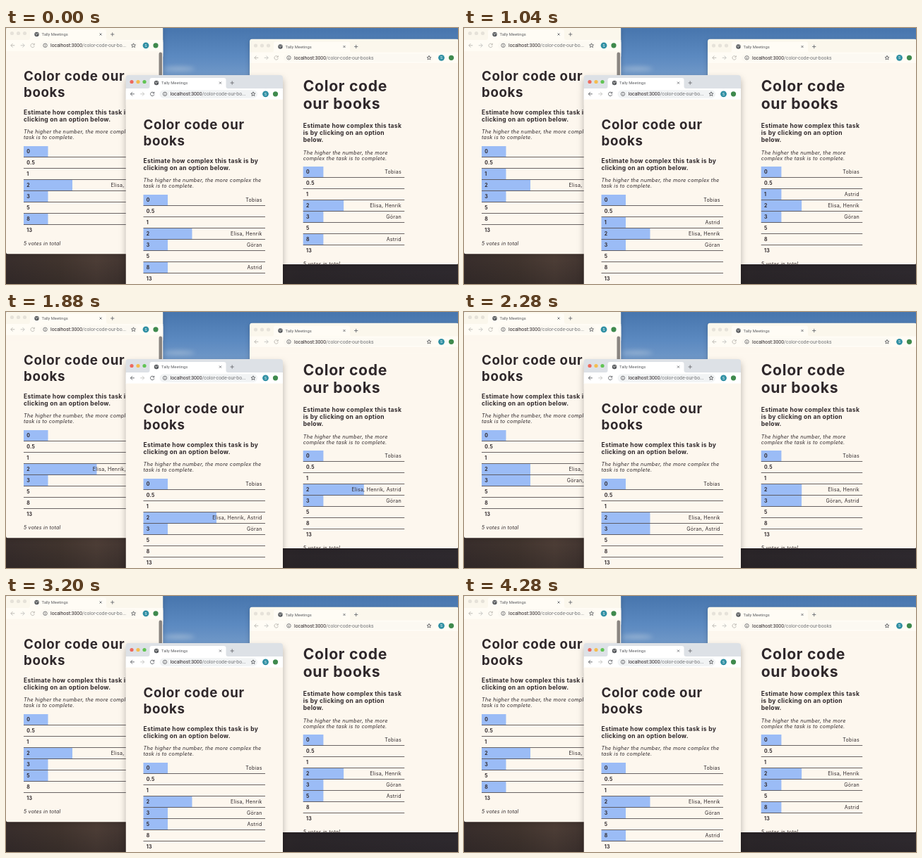
Write an HTML page that moves like this. It is 640 by 364 pixels and loops after 4320 ms.

```html
<!DOCTYPE html>
<html lang="en">
<head>
<meta charset="utf-8">
<title>Task voting</title>
<style>
  html, body { margin: 0; width: 100%; height: 100%; overflow: hidden; background: #332a2a; }
  #stage { display: block; width: 640px; height: 364px; }
  text { font-family: Inter, "Open Sans", sans-serif; letter-spacing: .035em; fill: #2f282b; white-space: pre; }
  .ui { font-family: Roboto, Arial, sans-serif; letter-spacing: 0; }
  .b { font-weight: 700; }
  .i { font-style: italic; }
  .win { filter: drop-shadow(0 2px 3px rgba(0, 0, 0, .2)); }
  .win.active { filter: drop-shadow(0 5px 5px rgba(0, 0, 0, .28)); }
  .icon { fill: none; stroke-width: .9; }
</style>
</head>
<body>
<svg id="stage" viewBox="0 0 640 364">
  <defs>
    <linearGradient id="sky" x2="0" y2="1">
      <stop offset="0" stop-color="#4775ad"/>
      <stop offset=".5" stop-color="#5b89c0"/>
      <stop offset="1" stop-color="#7a9fcb"/>
    </linearGradient>
    <linearGradient id="ground">
      <stop offset="0" stop-color="#3a2f2d"/>
      <stop offset=".12" stop-color="#43362f"/>
      <stop offset=".2" stop-color="#504038"/>
      <stop offset=".3" stop-color="#40332f"/>
      <stop offset=".65" stop-color="#2d282c"/>
      <stop offset="1" stop-color="#322d33"/>
    </linearGradient>
    <linearGradient id="dusk" x2="0" y2="1">
      <stop offset="0" stop-color="#1e1a1c" stop-opacity="0"/>
      <stop offset="1" stop-color="#1e1a1c" stop-opacity=".35"/>
    </linearGradient>
    <filter id="soft" x="-50%" y="-200%" width="200%" height="500%">
      <feGaussianBlur stdDeviation="3"/>
    </filter>
  </defs>
  <rect width="640" height="80" fill="url(#sky)"/>
  <ellipse cx="245" cy="58" rx="22" ry="3" fill="#c3d0e0" opacity=".5" filter="url(#soft)"/>
  <rect y="80" width="640" height="284" fill="url(#ground)"/>
  <rect y="320" width="640" height="44" fill="url(#dusk)"/>
  <g id="windows"></g>
</svg>
<script>
const LOOP = 4320, STEP = 40, FADE = 300, ROW = 16, VOTES = 5;
const options = ['0', '0.5', '1', '2', '3', '5', '8', '13'];
const voters = { 0: ['Tobias'], 3: ['Elisa', 'Henrik'], 4: ['Göran'] };
const mover = 'Astrid';
// [start time, option index the mover switches to]
const moves = [[350, 2], [1180, 3], [1980, 4], [2830, 5], [3670, 6]];

// blocks: first baseline, line height, font size, class, lines
const narrow = {
  left: 25, width: 172.5, rowY: 185.5,
  blocks: [
    [77.2, 23, 18.65, 'b', ['Color code our', 'books']],
    [124.8, 10.1, 8.5, 'b', ['Estimate how complex this task is by', 'clicking on an option below.']],
    [151.8, 8.4, 7.25, 'i', ['The higher the number, the more complex the', 'task is to complete.']]
  ]
};
const wide = {
  left: 75.7, width: 143.5, rowY: 197,
  blocks: [
    [74, 25.7, 21.1, 'b', ['Color code', 'our books']],
    [126.6, 10.1, 8.5, 'b', ['Estimate how complex this task', 'is by clicking on an option', 'below.']],
    [164.3, 8.4, 7.25, 'i', ['The higher the number, the more', 'complex the task is to complete.']]
  ]
};
const windows = [
  { x: 0, y: -2, w: 222.5, h: 323.5, page: narrow, path: 'color-code-our-bo...', lag: 0, scroll: true },
  { x: 345, y: 15.5, w: 296, h: 320.5, page: wide, path: 'color-code-our-books', lag: 25 },
  { x: 169.5, y: 67, w: 222.5, h: 400, page: narrow, path: 'color-code-our-bo...', lag: 0, active: true }
];

const text = (x, y, size, cls, str, attrs = '') =>
  `<text x="${x}" y="${y}" font-size="${size}" class="${cls}" ${attrs}>${str}</text>`;
const rect = (x, y, w, h, fill, attrs = '') =>
  `<rect x="${x}" y="${y}" width="${w}" height="${h}" fill="${fill}" ${attrs}/>`;
const circle = (x, y, r, fill) => `<circle cx="${x}" cy="${y}" r="${r}" fill="${fill}"/>`;
const icon = (x, y, d, color) =>
  `<path class="icon" transform="translate(${x} ${y})" d="${d}" stroke="${color}"/>`;

function browserBar({ w, active, path }) {
  const ink = active ? '#5a5d61' : '#b9b6b0';
  const lights = active ? ['#ed6a5e', '#f4bd4f', '#61c454'] : Array(3).fill('#e6e2d9');
  const bar = active ? '#fff' : '#fffcf5';
  return rect(0, 0, w, 40, active ? '#dde1e6' : '#fbf7ec', 'rx="4"')
    + lights.map((c, i) => circle(8.5 + 9 * i, 9.5, 2.6, c)).join('')
    + `<path d="M31 19q3 0 3-3V7q0-3 3-3H139q3 0 3 3v9q0 3 3 3z" fill="${bar}"/>`
    + circle(43.5, 11, 3.2, '#55585c')
    + icon(43.5, 11, 'M-2-1.2L0-.4L-.6 1.6M1-2L2-.2', '#d8d8d6')
    + text(50.5, 13, 5.8, 'ui', 'Tally Meetings', 'style="fill:#5d5f63"')
    + icon(134, 11, 'M-1.5-1.5L1.5 1.5M1.5-1.5L-1.5 1.5', '#6d6f73')
    + icon(150.7, 11, 'M-2.6 0H2.6M0-2.6V2.6', '#6d6f73')
    + rect(0, 19, w, 16, bar)
    + rect(48, 21.3, w - 84, 11.4, active ? '#f1f3f4' : '#fcf9f2', 'rx="5.7"')
    + icon(9.5, 26.8, 'M2.8 0H-2.6M0-2.7L-2.7 0L0 2.7', ink)
    + icon(23.5, 26.8, 'M-2.8 0H2.6M0-2.7L2.7 0L0 2.7', '#c2c2c0')
    + icon(37.7, 26.8, 'M2-1.7A2.7 2.7 0 1 0 2.6 .7M2.6-3V-.9H.5', ink)
    + icon(55.5, 26.8, 'M-2.7 0a2.7 2.7 0 1 0 5.4 0a2.7 2.7 0 1 0-5.4 0M0-.3V1.6M0-1.6V-.9', '#6b6d70')
    + text(63, 29.2, 6.85, 'ui', `localhost:3000<tspan fill="#75777a">/${path}</tspan>`)
    + icon(w - 42, 26.8, 'M0-3L.9-.9L3-.8L1.4 .6L1.9 2.7L0 1.5L-1.9 2.7L-1.4 .6L-3-.8L-.9-.9Z', '#606266')
    + circle(w - 24.5, 26.8, 4.4, '#2f8fa3')
    + text(w - 24.5, 28.6, 5, 'ui', 'S', 'text-anchor="middle" style="fill:#fff"')
    + circle(w - 10.5, 26.8, 3.6, '#3f8a4e');
}

function pageBody({ left, width, rowY, blocks }) {
  const copy = blocks.map(([y, gap, size, cls, lines]) =>
    lines.map((s, i) => text(left, y + gap * i, size, cls, s)).join('')).join('');
  const rows = options.map((label, i) => {
    const y = rowY + ROW * i;
    return rect(left, y - 15.5, 0, 15.5, '#9bbcf6', 'data-bar')
      + (i < options.length - 1 ? rect(left, y - .5, width, .75, '#3a3336') : '')
      + text(left + 4.3, y - 5.7, 6.9, 'b', label)
      + text(left + width - 4.3, y - 5.8, 7.1, '', '', 'text-anchor="end" data-names');
  }).join('');
  return copy + rows + text(left, rowY + 125.5, 7, 'i', VOTES + ' votes in total');
}

document.getElementById('windows').innerHTML = windows.map(v =>
  `<g class="win ${v.active ? 'active' : ''}"><svg x="${v.x}" y="${v.y}" width="${v.w}" height="${v.h}">`
  + rect(0, 20, v.w, v.h - 20, '#fdf7ee', 'rx="3"')
  + browserBar(v) + rect(0, 34.6, v.w, 8, '#fdf7ee') + pageBody(v.page)
  + (v.scroll ? rect(216.5, 36.5, 4.6, 90, '#8a8581', 'rx="2.3"') : '')
  + '</svg></g>').join('');

document.querySelectorAll('.win').forEach((el, i) => {
  windows[i].bars = el.querySelectorAll('[data-bar]');
  windows[i].names = el.querySelectorAll('[data-names]');
});

// CSS "ease": cubic-bezier(.25, .1, .25, 1)
function ease(x) {
  if (x >= 1) return 1;
  const curve = (a, b, s) => 3 * a * s * (1 - s) ** 2 + 3 * b * s * s * (1 - s) + s ** 3;
  let lo = 0, hi = 1;
  for (let i = 0; i < 16; i++) {
    const mid = (lo + hi) / 2;
    if (curve(.25, .25, mid) < x) lo = mid; else hi = mid;
  }
  return curve(.1, 1, lo);
}

function draw({ page, bars, names, lag }, time) {
  const t = time - lag;
  const n = moves.filter(([start]) => start <= t).length;
  const rowAfter = k => moves[(k + moves.length - 1) % moves.length][1];
  const to = rowAfter(n);
  const from = n ? rowAfter(n - 1) : to;
  const p = n ? ease((t - moves[n - 1][0]) / FADE) : 1;
  options.forEach((_, i) => {
    const who = voters[i] || [];
    const extra = i === to ? p : i === from ? 1 - p : 0;
    bars[i].setAttribute('width', page.width * (who.length + extra) / VOTES);
    const list = (i === to ? [...who, mover] : who).join(', ');
    if (names[i].textContent !== list) names[i].textContent = list;
  });
}

const origin = performance.now();
function tick() {
  const t = (performance.now() - origin) % LOOP;
  const time = Math.floor(t / STEP) * STEP;
  windows.forEach(v => draw(v, time));
  requestAnimationFrame(tick);
}
tick();
</script>
</body>
</html>
```
